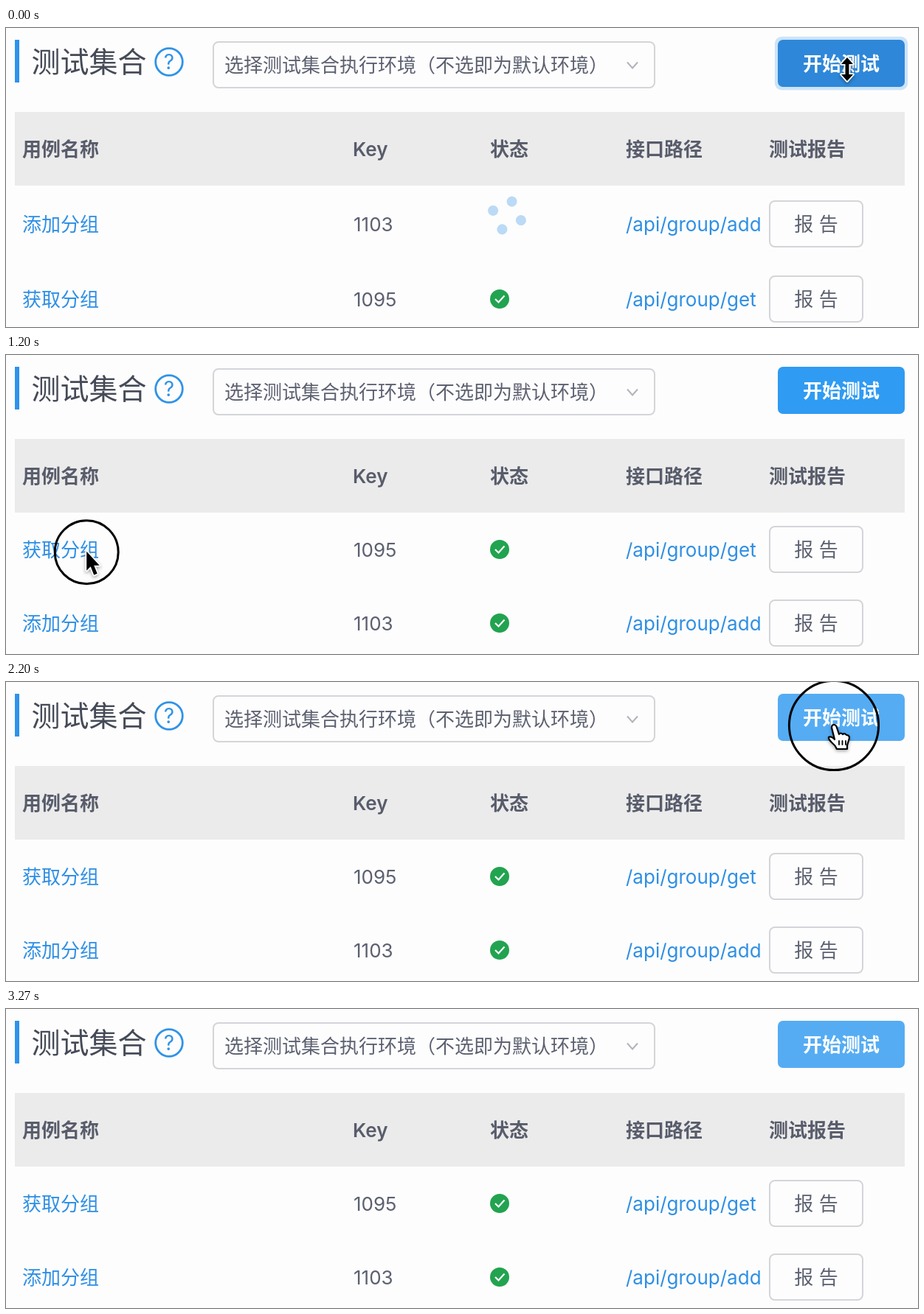
An HTML page that plays this animation: 1236x406 px, repeating every 3.34 s.

```html
<!DOCTYPE html>
<html lang="zh-CN">
<head>
<meta charset="utf-8">
<style>
  html, body { margin: 0; width: 100%; height: 100%; overflow: hidden; background: #fdfdfd; }
  svg { display: block; width: 1236px; height: 406px; }
  text { font: 26px Inter, "Noto Sans CJK SC", "Noto Sans CJK", sans-serif; fill: #5c6070; white-space: pre; }
  .head text { font-weight: 600; fill: #585c6b; }
  .link { fill: #2e8fe4; }
  .box { fill: none; stroke: #d4d5d9; stroke-width: 2; }
  .mid { text-anchor: middle; }
  .arrow { fill: #000; stroke: #fff; stroke-width: 3.5; stroke-linejoin: round; paint-order: stroke; }
  .hand { fill: #fff; stroke: #000; stroke-width: 2.2; stroke-linejoin: round; stroke-linecap: round; }
  #cursor { filter: drop-shadow(0 2px 2px #0005); }
</style>
</head>
<body>
<svg viewBox="0 0 1236 406">
  <rect x="12" y="16" width="6" height="58" fill="#2e92ec"/>
  <text x="34.500" y="60" style="font-size:39px;fill:#454a57">测试集合</text>
  <circle cx="221" cy="46" r="18.3" fill="none" stroke="#3093e8" stroke-width="2.8"/>
  <text x="221" y="56" class="mid" style="font-size:28px;fill:#3093e8">?</text>

  <rect class="box" x="281" y="19" width="598" height="62" rx="7"/>
  <text x="296" y="60">选择测试集合执行环境（不选即为默认环境）</text>
  <path d="M842 46.5l7 8 7-8" fill="none" stroke="#b2b4bb" stroke-width="2"/>

  <rect id="wave" fill="#2e8fe9"/>
  <rect id="start" x="1046" y="16" width="172" height="64" rx="7"/>
  <text x="1132" y="58" class="mid" style="fill:#fff;font-weight:600">开始测试</text>

  <rect x="12" y="114" width="1206" height="100" fill="#ebebeb"/>
  <g class="head">
    <text x="22" y="174">用例名称</text>
    <text x="470" y="174">Key</text>
    <text x="656" y="174">状态</text>
    <text x="840" y="174">接口路径</text>
    <text x="1034" y="174">测试报告</text>
  </g>
  <g id="rows"></g>

  <circle id="ring" fill="none" stroke="#000" stroke-width="3"/>
  <g id="cursor">
    <path id="arrow" class="arrow" d="M0 0V26L5.5 20.5 10 32 14.5 30 10 19H17.5Z"/>
    <path id="resize" class="arrow" d="M0-16L8-7H2.5V7H8L0 16-8 7H-2.5V-7H-8Z"/>
    <g id="hand" class="hand">
      <path d="M-3 4Q-3 0 0 0T4 4L7 13Q9 10 12 13 15 11 17 14 21 14 21 18L18 28V33H4Q2 28-3 24-8 19-7 17-4 15 1 20Z"/>
      <path d="M7 22v5M11.500 22v5M16 22v5" stroke-width="1.8"/>
    </g>
  </g>
</svg>
<script>
const LOOP = 3340;
const CLICKS = [-75, 2380];   // button releases
const TEST = 105;             // running time of one test
const $ = id => document.getElementById(id);
const set = (el, attrs) => { for (const k in attrs) el.setAttribute(k, attrs[k]); };
const show = (el, on) => el.style.display = on ? '' : 'none';
const within = (t, a, b) => t >= a && t < b;
const lastClick = t => CLICKS.findLast(c => c <= t);

function makeRow(name, key, path) {
  const g = document.createElementNS('http://www.w3.org/2000/svg', 'g');
  const dots = [0, 90, 180, 270].map(a => `<circle cx="20" r="7" transform="rotate(${a})"/>`).join('');
  g.innerHTML = `
    <text class="link name" x="22" y="10">${name}</text>
    <text x="471" y="10">${key}</text>
    <g class="done"><circle cx="669" r="13" fill="#22a350"/>
      <path d="M663 0l4.500 4.500 8-9" fill="none" stroke="#fff" stroke-width="2.200"/></g>
    <g class="spin" fill="#bbdaf6">${dots}</g>
    <text class="link" x="840" y="10">${path}</text>
    <rect class="box" x="1035" y="-31" width="126" height="62" rx="7"/>
    <text class="mid" x="1098" y="10">报 告</text>`;
  $('rows').append(g);
  const part = c => g.querySelector('.' + c);
  return { g, name: part('name'), done: part('done'), spin: part('spin') };
}
const addRow = makeRow('添加分组', 1103, '/api/group/add');
const getRow = makeRow('获取分组', 1095, '/api/group/get');

// Keys are [time, ...values]
const segment = (keys, t) => Math.max(1, keys.findIndex(k => k[0] > t));
const smooth = p => p * p * (3 - 2 * p);

function blend(keys, t) {
  const i = segment(keys, t), a = keys[i - 1], b = keys[i];
  const p = smooth((t - a[0]) / (b[0] - a[0]));
  return a.slice(1).map((v, n) => v + (b[n + 1] - v) * p);
}

// Monotone cubic: flows through the keys, rests only at turns and holds
function glide(keys, t) {
  const i = segment(keys, t), [a, b] = [keys[i - 1], keys[i]];
  const h = b[0] - a[0], p = (t - a[0]) / h;
  return [1, 2].map(n => {
    const slope = j => j > 0 && j < keys.length ? (keys[j][n] - keys[j - 1][n]) / (keys[j][0] - keys[j - 1][0]) : 0;
    const tangent = j => {
      const u = slope(j), v = slope(j + 1);
      return u * v > 0 ? 2 * u * v / (u + v) : 0;
    };
    return a[n] + (b[n] - a[n]) * smooth(p)
      + h * p * (1 - p) * (tangent(i - 1) * (1 - p) - tangent(i) * p);
  });
}

const pointer = [
  [0, 1140, 56], [400, 230, 304], [650, 94, 361], [940, 94, 361], [1130, 108, 270],
  [1230, 110, 265], [1670, 940, 164], [1950, 1122, 58], [2200, 1122, 58],
  [2530, 1121, 65], [2620, 1121, 65], [3050, 1060, 430], [LOOP, 1060, 430]
];
const active = [39, 128, 211], idle = [35, 149, 241], light = [85, 172, 243];
const tint = [
  [-75, ...active], [225, ...light], [1000, ...light], [1300, ...idle], [1830, ...idle],
  [2130, ...light], [2200, ...light], [2380, ...active], [2530, ...light], [LOOP, ...light]
];

function drawRows(t) {
  const order = t < 1080 ? [addRow, getRow] : [getRow, addRow];
  const run = t - lastClick(t) - 12;
  let top = 214;
  order.forEach((row, i) => {
    const age = run - i * TEST, busy = within(age, 0, TEST);
    const height = busy ? 104 : 100;
    set(row.g, { transform: `translate(0 ${top + height / 2})` });
    set(row.spin, { transform: `translate(679 -11.500) rotate(${age * 0.3})` });
    show(row.spin, busy);
    show(row.done, !busy);
    top += height;
  });
  getRow.name.style.fill = within(t, 600, 1080) ? '#5c6070' : '';
}

function drawButton(t) {
  set($('start'), { fill: `rgb(${blend(tint, t)})` });
  const age = (t - lastClick(t)) / 400;
  show($('wave'), age < 1);
  if (age >= 1) return;
  const p = 1 - (1 - age) ** 2, d = 12 * p;
  set($('wave'), {
    x: 1046 - d, y: 16 - d, width: 172 + 2 * d, height: 64 + 2 * d,
    rx: 7 + d / 2, opacity: 0.55 * (1 - p) ** 2
  });
}

function drawPointer(t) {
  const [x, y] = glide(pointer, t);
  const onButton = x > 1046 && within(y, 16, 80) && t > 1000;
  set($('cursor'), { transform: `translate(${x} ${y})` });
  show($('resize'), t < 60);
  show($('hand'), onButton);
  show($('arrow'), t >= 60 && !onButton);

  // The ring closes in on the pointer while the mouse is held
  const press = t < 2000 ? 800 : 2185;
  show($('ring'), within(t, 800, 1200) || within(t, press, CLICKS[1]));
  if (t >= press) set($('ring'), { cx: x, cy: y + 1, r: Math.max(43, 63 - (t - press) * 0.15) });
}

function frame(now) {
  const t = now % LOOP;
  drawRows(t);
  drawButton(t);
  drawPointer(t);
  requestAnimationFrame(frame);
}
requestAnimationFrame(frame);
</script>
</body>
</html>
```
